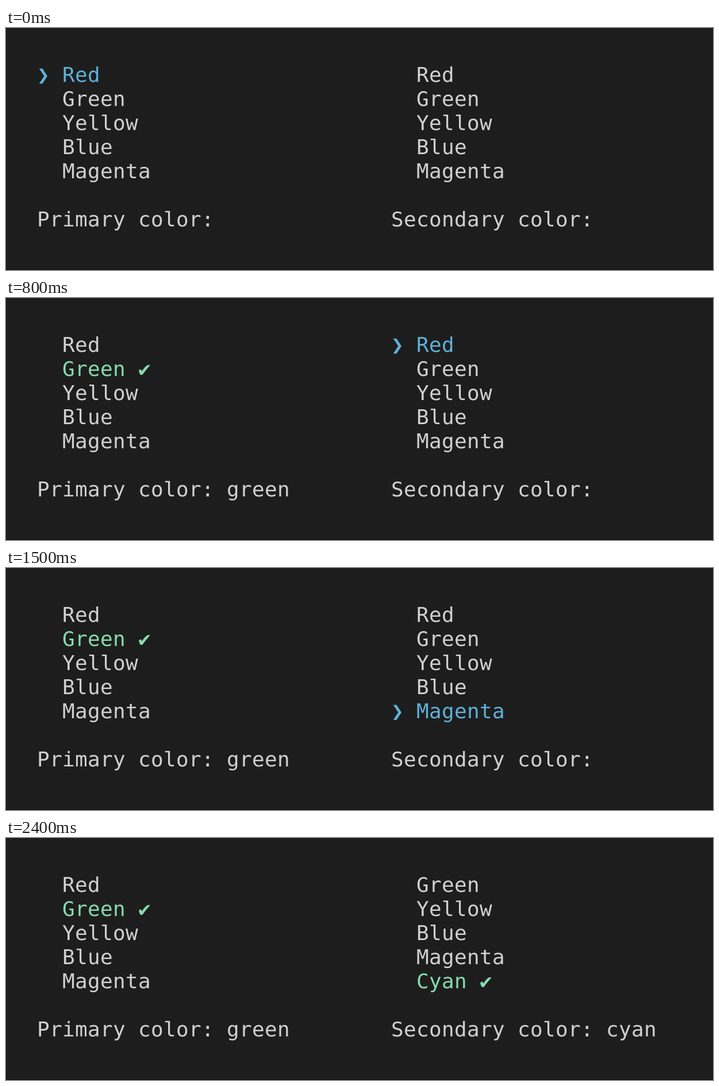
Recreate the animation shown at these times as an HTML page with a canvas. Size 1230 by 422 pixels, loop 3040 ms.

```html
<!DOCTYPE html>
<html lang="en">
<head>
<meta charset="utf-8">
<title>Color menus</title>
<style>
  html, body { margin: 0; width: 100%; height: 100%; overflow: hidden; background: #1d1d1d; }
  canvas { display: block; }
</style>
</head>
<body>
<canvas id="stage" width="1230" height="422"></canvas>
<script>
const ctx = document.getElementById("stage").getContext("2d");
const LOOP = 3040, CELL = 22, ROW = 42, LEFT = 54, BASE = 94, VISIBLE = 5;
const GREY = "#d0d0d0", BLUE = "#5fb0d9", GREEN = "#86dbad";
const COLORS = ["Red", "Green", "Yellow", "Blue", "Magenta", "Cyan"];

// moves: times at which the cursor reaches item 0, 1, 2 ...
const MENUS = [
  { col: 0, label: "Primary color:", moves: [0, 300], check: 670, submit: 730 },
  { col: 28, label: "Secondary color:", moves: [730, 1000, 1130, 1230, 1400, 1570], check: 1830, submit: 1930 }
];

// Write text on the terminal's character grid.
function put(text, col, row, color) {
  ctx.fillStyle = color;
  [...text].forEach((ch, i) => ctx.fillText(ch, LEFT + (col + i) * CELL, BASE + row * ROW));
}

function drawMenu({ col, label, moves, check, submit }, t) {
  const cursor = moves.filter(m => t >= m).length - 1;
  const first = Math.max(0, cursor - VISIBLE + 1);
  const done = t >= submit;

  COLORS.slice(first, first + VISIBLE).forEach((name, row) => {
    const current = first + row === cursor;
    put(name, col + 2, row, current ? (done ? GREEN : BLUE) : GREY);
    if (current && !done) put("❯", col, row, BLUE);
    if (current && t >= check) put("✔", col + 3 + name.length, row, GREEN);
  });
  put(done ? label + " " + COLORS[cursor].toLowerCase() : label, col, VISIBLE + 1, GREY);
}

function draw(now) {
  const t = now % LOOP;
  ctx.fillStyle = "#1d1d1d";
  ctx.fillRect(0, 0, 1230, 422);
  ctx.fillStyle = "#0e0e0e";
  ctx.fillRect(0, 421, 1230, 1);
  ctx.fillStyle = "#141414";
  ctx.fillRect(0, 0, 1, 421);
  ctx.font = '36px "DejaVu Sans Mono", monospace';
  MENUS.forEach(menu => drawMenu(menu, t));
}

const start = performance.now();
function tick() {
  draw(performance.now() - start);
  requestAnimationFrame(tick);
}
tick();
</script>
</body>
</html>
```
